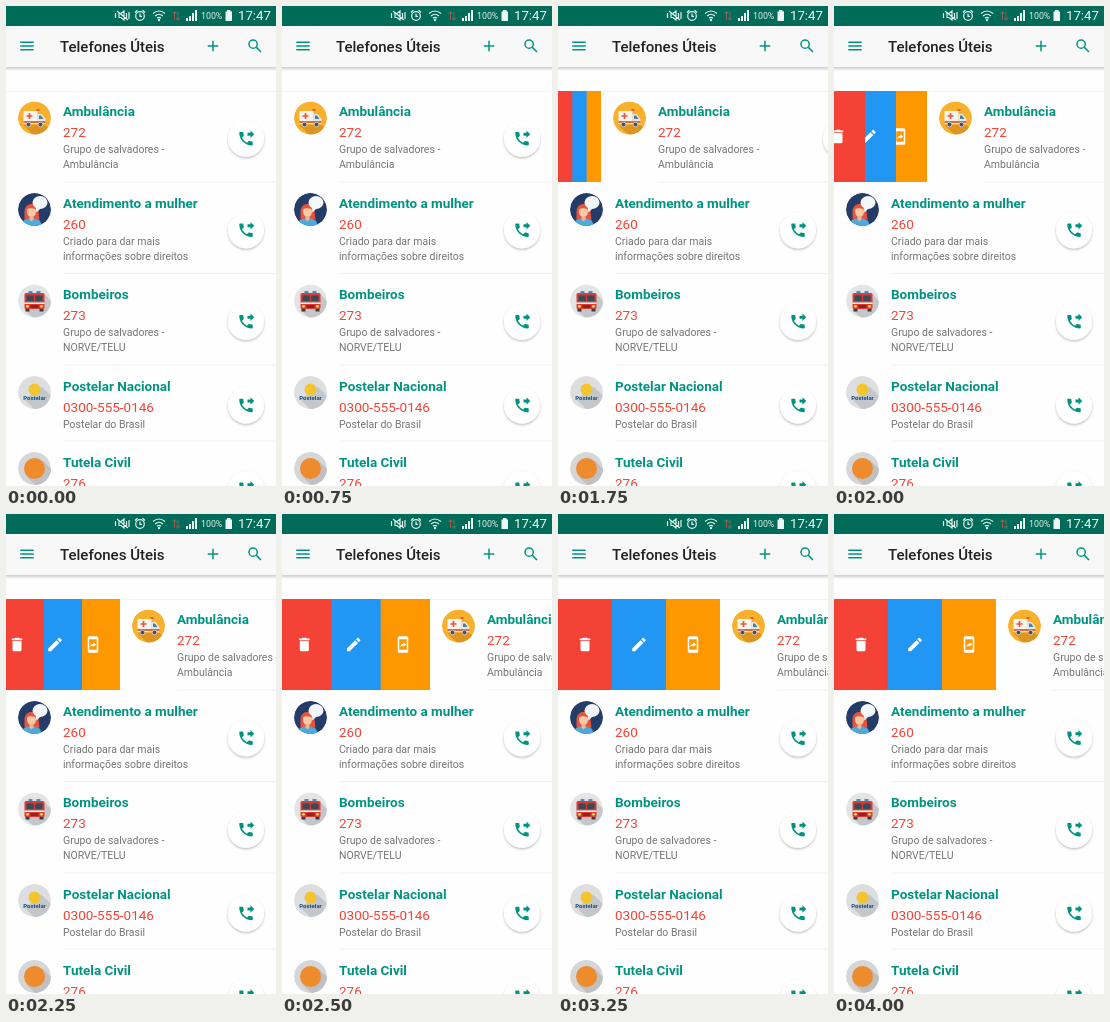
Recreate the animation shown at these times as an HTML page. Size 270 by 480 pixels, loop 4.25 s.

```html
<!DOCTYPE html>
<html lang="pt-BR">
<head>
<meta charset="utf-8">
<title>Telefones Úteis</title>
<style>
  html, body { margin: 0; width: 100%; height: 100%; overflow: hidden; background: #fff; }
  svg { display: block; width: 100vw; height: 100vh; }
  text { font-family: Roboto, sans-serif; }
  .name { font-size: 13.5px; font-weight: 700; fill: #009480; }
  .num { font-size: 13.5px; fill: #f44336; }
  .desc { font-size: 10.5px; fill: #757575; }
  .teal { fill: #009480; }
  .white { fill: #fff; }
</style>
</head>
<body>
<svg viewBox="0 0 270 480">
  <defs>
    <linearGradient id="shade" x1="0" y1="0" x2="0" y2="1">
      <stop offset="0" stop-color="#000" stop-opacity=".2"/>
      <stop offset="1" stop-color="#000" stop-opacity="0"/>
    </linearGradient>
    <filter id="lift" x="-30%" y="-30%" width="160%" height="170%">
      <feDropShadow dx="0" dy="1.3" stdDeviation="1.1" flood-opacity=".28"/>
    </filter>
    <clipPath id="disc"><circle r="16.5"/></clipPath>

    <g id="ambulance">
      <circle r="16.5" fill="#f9b02c"/>
      <path d="M-11 7H11L18 14V20H2z" fill="#dd9420"/>
      <path d="M-11-7H3V6H-11z" fill="#f5f3ee"/>
      <path d="M3-4H7L11 1V6H3z" fill="#e4e7e8"/>
      <path d="M4.5-2.5H6.5L9 1H4.5z" fill="#527d92"/>
      <path d="M-11 3H11V5H-11z" fill="#e5673f"/>
      <path d="M-5-5V1M-8-2H-2" stroke="#e8573f" stroke-width="1.7"/>
      <path d="M2-9H5V-7H2z" fill="#e8573f"/>
      <g fill="#44515c" stroke="#d5d9da" stroke-width=".8"><circle cx="-6" cy="6.5" r="2.3"/><circle cx="6" cy="6.5" r="2.3"/></g>
    </g>

    <g id="woman">
      <circle r="16.5" fill="#243c68"/>
      <path d="M-10 2C-10-8 4-8 4 2L5 10H-10z" fill="#e6533c"/>
      <ellipse cx="-3" cy="2" rx="4.5" ry="5.5" fill="#f7c9a4"/>
      <path d="M-8 0C-7-6 2-6 2 0C-2-1-5-2-8 0z" fill="#e6533c"/>
      <path d="M-13 17C-13 9-7 9-3 9S7 9 7 17z" fill="#4fa9dd"/>
      <path d="M-5 7H-1V10L-3 12L-5 10z" fill="#f0b68f"/>
      <ellipse cx="5.5" cy="-7" rx="7.5" ry="6.5" fill="#f4f7fa"/>
      <path d="M1-3L2 3L6-1z" fill="#f4f7fa"/>
    </g>

    <g id="truck">
      <circle r="16.5" fill="#e2e4e5"/>
      <path d="M-10 9L10-7L20 4V20H2z" fill="#c4c7ca"/>
      <rect x="-10" y="-8" width="20" height="16" rx="1.5" fill="#dc3a34"/>
      <path d="M-6-10H-2V-8H-6zM2-10H6V-8H2z" fill="#3f8fc4"/>
      <path d="M-8-5.5H-.7V0H-8zM.7-5.5H8V0H.7z" fill="#3b4856"/>
      <path d="M-10 1.5H10V3H-10z" fill="#fff"/>
      <path d="M-4 4H4V7H-4z" fill="#8c2623"/>
      <g fill="#f9d25a"><circle cx="-7" cy="5.3" r="1.4"/><circle cx="7" cy="5.3" r="1.4"/></g>
      <path d="M-9 8H-5V10.5H-9zM5 8H9V10.5H5z" fill="#343d46"/>
    </g>

    <g id="post">
      <circle r="16.5" fill="#dcdedf"/>
      <path d="M-10 7L7-6L20 7V20H3z" fill="#c3c7c9"/>
      <circle cy="-3" r="6" fill="#f4c42c"/>
      <text y="7.5" font-size="6" font-weight="700" text-anchor="middle" fill="#174f80">Postelar</text>
    </g>

    <g id="guard">
      <circle r="16.5" fill="#d5d6d8"/>
      <path d="M-8 8L8-8L20 4V20H4z" fill="#bec0c3"/>
      <circle r="10.5" fill="#ee8b2d"/>
    </g>

    <path id="call" d="M18 11l5-5-5-5v3h-4v4h4zm2 4.5c-1.25 0-2.45-.2-3.57-.57-.35-.11-.74-.03-1.02.24l-2.2 2.2c-2.83-1.44-5.15-3.75-6.59-6.59l2.2-2.21c.28-.26.36-.65.25-1C8.7 6.45 8.5 5.25 8.5 4c0-.55-.45-1-1-1H4c-.55 0-1 .45-1 1 0 9.4 7.6 17 17 17 .55 0 1-.45 1-1v-3.5c0-.55-.45-1-1-1z"/>
    <path id="trash" d="M6 19q0 2 2 2h8q2 0 2-2V7H6zM19 4h-3.5l-1-1h-5l-1 1H5v2h14z"/>
    <path id="pencil" d="M3 17.25V21h3.75L17.8 9.94l-3.75-3.75zM20.7 7q.6-.7 0-1.4l-2.3-2.3q-.7-.6-1.4 0l-1.9 1.8 3.75 3.75z"/>
    <path id="share" d="M17 1H7Q5 1 5 3v18q0 2 2 2h10q2 0 2-2V3q0-2-2-2zm0 18H7V5h10zM8 15.4q1.4-4.2 4.8-4.7V9l3.2 3-3.2 3v-1.7q-3.2 0-4.8 2.1z"/>
    <path id="menu" d="M3 6h18v2H3zm0 5h18v2H3zm0 5h18v2H3z"/>
    <path id="add" d="M19 13h-6v6h-2v-6H5v-2h6V5h2v6h6z"/>
    <g id="search" fill="none" stroke="#009480" stroke-width="2">
      <circle cx="9.5" cy="9.5" r="5.5"/><path d="M13.5 13.5L20 20"/>
    </g>
  </defs>

  <rect width="270" height="480" fill="#fefefe"/>
  <g id="list"></g>
  <g id="actions"></g>

  <rect y="61" width="270" height="4" fill="url(#shade)"/>
  <rect y="20" width="270" height="41" fill="#f8f8f8"/>
  <g id="tools" class="teal"></g>
  <text x="54" y="45.5" font-size="15" font-weight="500" fill="#212121">Telefones Úteis</text>

  <rect width="270" height="20" fill="#006b58"/>
  <g fill="none" stroke="#e4f1ee" stroke-width="1.2">
    <path d="M113 7.5H115L118 5V14L115 11.5H113zM111 5L122 14M120.5 7V12M123 6V13M109.5 7V12"/>
    <circle cx="134" cy="10" r="4.3"/>
    <path d="M134 7.5V10.3H136M129 6.5L131.5 4.2M139 6.5L136.5 4.2"/>
    <path d="M147 7.5Q153 2.5 159 7.5M149 10Q153 6.5 157 10M151 12.3Q153 10.5 155 12.3"/>
  </g>
  <circle cx="153" cy="14" r="1.2" fill="#e4f1ee"/>
  <path d="M168.5 14V6M166.5 8L168.5 5.5L170.5 8" fill="none" stroke="#a55b4c"/>
  <path d="M172 5.5V14M170 12L172 14.5L174 12" fill="none" stroke="#7d6a5c"/>
  <g id="signal" fill="#eef6f4"></g>
  <path d="M221 4H224.5V5.5H226V15H219.5V5.5H221z" fill="#eef6f4"/>
  <text x="195" y="13.2" font-size="8.8" fill="#e4f1ee">100%</text>
  <text x="232" y="14.4" font-size="13.2" fill="#f4faf8">17:47</text>
</svg>
<script>
const LOOP = 4250, STEP = 250, TAB = 54;
const get = id => document.getElementById(id);

// 24-unit icon centred on x, y at 18 px
const icon = (id, x, y, cls) =>
  `<use href="#${id}" class="${cls}" transform="translate(${x - 9} ${y - 9}) scale(.75)"/>`;

const contacts = [
  { top: 85, h: 91.5, pic: 'ambulance', name: 'Ambulância', num: '272', desc: ['Grupo de salvadores -', 'Ambulância'] },
  { top: 176.5, h: 91.5, pic: 'woman', name: 'Atendimento a mulher', num: '260', desc: ['Criado para dar mais', 'informações sobre direitos'] },
  { top: 268, h: 91.5, pic: 'truck', name: 'Bombeiros', num: '273', desc: ['Grupo de salvadores -', 'NORVE/TELU'] },
  { top: 359.5, h: 76, pic: 'post', name: 'Postelar Nacional', num: '0300-555-0146', desc: ['Postelar do Brasil'] },
  { top: 435.5, h: 91.5, pic: 'guard', name: 'Tutela Civil', num: '276', desc: [] }
];

const row = ({ top, h, pic, name, num, desc }, i) => {
  const mid = h / 2 + 2;
  return `<g id="row${i}" transform="translate(0 ${top})">
    <path d="M57 ${h - .5}H270" stroke="#f1f1f1"/>
    <g transform="translate(28.5 27)" clip-path="url(#disc)"><use href="#${pic}"/></g>
    <text class="name" x="57" y="25">${name}</text>
    <text class="num" x="57" y="46">${num}</text>
    ${desc.map((line, k) => `<text class="desc" x="57" y="${62 + 15.2 * k}">${line}</text>`).join('')}
    <circle cx="240" cy="${mid}" r="18" fill="#fff" filter="url(#lift)"/>
    ${icon('call', 240, mid, 'teal')}
  </g>`;
};

const tabs = [['trash', '#f44336'], ['pencil', '#2196f3'], ['share', '#ff9800']];

get('list').innerHTML = '<path d="M0 85.5H270" stroke="#f3f3f3"/>' + contacts.map(row).join('');
get('tools').innerHTML = icon('menu', 21, 40, '') + icon('add', 207, 40, '') + icon('search', 249, 40, '');
get('signal').innerHTML = [3, 5, 8, 11].map((h, i) =>
  `<rect x="${179 + 1 + 3 * i}" y="${15 - h}" width="2" height="${h}"/>`).join('');
// The first tab lies on top, so it is drawn last
get('actions').innerHTML = tabs.map(([id, fill], i) =>
  `<g id="tab${i}"><rect y="85" width="${TAB}" height="91" fill="${fill}"/>${icon(id, TAB / 2, 130.5, 'white')}</g>`
).reverse().join('');

// Finger drag in quarter-second steps
const drag = [43, 93, 114, 148, 162];
const DRAG_START = 1750;

function render(ms) {
  const n = Math.floor((ms - DRAG_START) / STEP);
  const x = n < 0 ? 0 : drag[Math.min(n, drag.length - 1)];
  get('row0').setAttribute('transform', `translate(${x} ${contacts[0].top})`);
  tabs.forEach((_, i) =>
    get('tab' + i).setAttribute('transform', `translate(${(i + 1) * x / 3 - TAB} 0)`));
  get('actions').setAttribute('visibility', x ? 'visible' : 'hidden');
}

const start = performance.now();
function tick() {
  render((performance.now() - start) % LOOP);
  requestAnimationFrame(tick);
}
tick();
</script>
</body>
</html>
```
